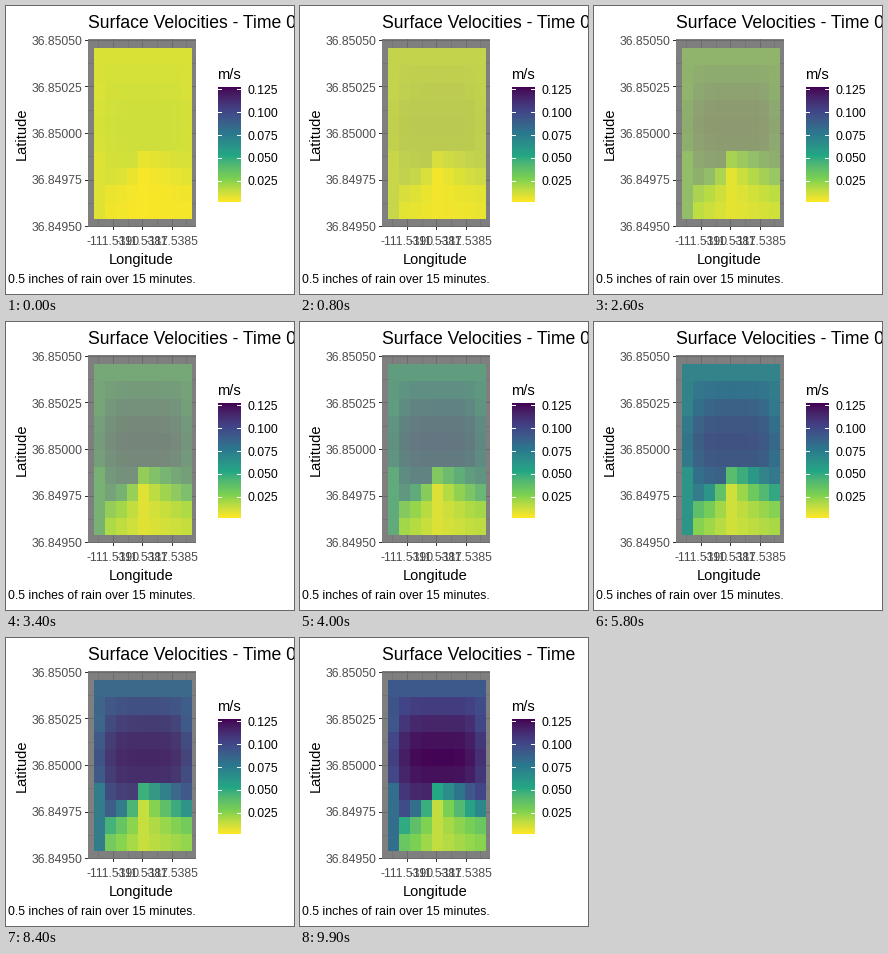
These frames come from a looping animation (288 px wide and 288 px high, 10 s). A matplotlib script:

```python
import numpy as np
import matplotlib.pyplot as plt
from matplotlib.animation import FuncAnimation
from matplotlib.colors import to_rgb
from matplotlib.patches import Rectangle

SIZE, DPI = 288, 96
FRAMES, INTERVAL = 100, 100
HALF = FRAMES * INTERVAL / 2
GROWTH = [0.08, 0.7, 1.0]  # share of the final speed at start, half and end
TITLE = "Surface Velocities - Time"
plt.rcParams["font.family"] = "Liberation Sans"

RGB_TO_XYZ = np.array([[0.4124, 0.3576, 0.1805],
                       [0.2126, 0.7152, 0.0722],
                       [0.0193, 0.1192, 0.9505]])
WHITE = RGB_TO_XYZ.sum(axis=1)


def to_lab(rgb):
    """Lab colour as (fx, fy, fz); blending these equals blending in Lab."""
    linear = np.where(rgb > 0.04045, ((rgb + 0.055) / 1.055) ** 2.4, rgb / 12.92)
    t = linear @ RGB_TO_XYZ.T / WHITE
    return np.where(t > 0.008856, np.cbrt(t), 7.787 * t + 16 / 116)


def from_lab(f):
    t = np.where(f > 0.2069, f ** 3, (f - 16 / 116) / 7.787)
    linear = np.clip((t * WHITE) @ np.linalg.inv(RGB_TO_XYZ).T, 0, 1)
    return np.where(linear > 0.0031308, 1.055 * linear ** (1 / 2.4) - 0.055, 12.92 * linear)


SCALE = to_lab(np.array([to_rgb(c) for c in (
    "#fde725", "#7ad151", "#22a884", "#2a788e", "#414487", "#440154")]))


def ramp(speed):
    """Lab colour of a speed between 0 (yellow) and 1 (purple)."""
    stops = np.linspace(0, 1, len(SCALE))
    return np.stack([np.interp(speed, stops, SCALE[:, i]) for i in range(3)], axis=-1)


def speed_field():
    """Fast slope above, slow fan spreading downward from one cell."""
    r, c = np.mgrid[0:10, 0:9].astype(float)
    edge = 0.18 * (np.abs(c - 4.2) / 4.2) ** 4 * np.minimum(r / 2, 1)
    slope = 1 - 0.27 * (np.abs(r - 4) / 4) ** 1.7 - edge
    left = c < 4
    spread = np.where(left, 0.27, 0.11) * np.abs(c - 4) / np.maximum(r - 6, 1) ** 1.5
    rise = np.where(left, 0.6, 0.3) * np.maximum(7 - r, 0) ** 1.6
    field = np.minimum(slope, 0.1 + spread + rise)
    field[6:, 0] = 0.64  # left bank
    return field


FIELD = speed_field()


def cell_colors(ms):
    k, u = divmod(ms / HALF, 1)
    a, b = (ramp(FIELD * g) for g in GROWTH[int(k):int(k) + 2])
    return from_lab(a * (1 - u) + b * u)


fig = plt.figure(figsize=(SIZE / DPI, SIZE / DPI), dpi=DPI, facecolor="white")
ax = fig.add_axes([0, 0, 1, 1])
ax.axis("off")


def box(x, y, w, h, color, z=1):
    ax.add_patch(Rectangle((round(x), round(y)), w, h, fc=color, lw=0,
                           antialiased=False, zorder=z))


def label(x, y, text, size=9.15, color="black", **kw):
    kw.setdefault("va", "baseline")
    return ax.text(x, y, text, size=size, color=color, zorder=6, **kw)


# Panel with grid and axes
LEFT, TOP, WIDTH, HEIGHT = 82, 33, 108, 188
X0, DX, Y0, DY = 107, 29.3, 34, 46.5
MAJOR, MINOR, TICK, TEXT = "#6b6b6b", "#757575", "#333333", "#4d4d4d"
box(LEFT, TOP, WIDTH, HEIGHT, "#7f7f7f")

for i in range(4):
    box(X0 + DX * (i - 0.5), TOP, 1, HEIGHT, MINOR, 2)
    box(LEFT, Y0 + DY * (i + 0.5), WIDTH, 1, MINOR, 2)

for i in range(5):
    y = Y0 + DY * i
    box(LEFT, y, WIDTH, 1, MAJOR, 2)
    box(LEFT - 3, y, 3, 1, TICK, 2)
    label(76.5, y + 5, f"{36.8505 - 0.00025 * i:.5f}", color=TEXT, ha="right")

for i, name in enumerate(["-111.5390", "-111.5387", "-111.5385"]):
    x = X0 + DX * i
    box(x, TOP, 1, HEIGHT, MAJOR, 2)
    box(x, TOP + HEIGHT, 1, 3, TICK, 2)
    label(x, 239, name, color=TEXT, ha="center")

# Cells
xs = np.round(88 + 10.93 * np.arange(10))
ys = np.round(42.4 + 17.07 * np.arange(11))
cells = ax.pcolormesh(xs, ys, cell_colors(0), antialiased=False, linewidth=0, zorder=3)

# Colour bar
shades = from_lab(ramp(np.linspace(1, 0, 115)))[:, None]
ax.imshow(shades, extent=(212, 235, 196, 81), aspect="auto",
          interpolation="nearest", zorder=3)
for i in range(5):
    y = 83 + 22.9 * i
    for x in (212, 231):
        box(x, y, 4, 1, "white", 4)
    label(242, y + 4.7, f"{0.125 - 0.025 * i:.3f}")

# Titles
title = label(82, 22, TITLE, 13.2)
label(211.4, 73, "m/s", 11)
label(135.5, 258, "Longitude", 11, ha="center")
label(22.5, 127.5, "Latitude", 11, rotation=90, ha="right", va="center")
label(189.5, 277, "0.5 inches of rain over 15 minutes.", ha="right")

ax.set_xlim(0, SIZE)
ax.set_ylim(SIZE, 0)


def update(frame):
    cells.set_array(cell_colors(frame * INTERVAL))
    title.set_text(TITLE + (" 0" if frame < FRAMES - 1 else ""))
    return cells, title


anim = FuncAnimation(fig, update, frames=FRAMES, interval=INTERVAL,
                     repeat=True, repeat_delay=0, blit=False)
plt.show()
```
